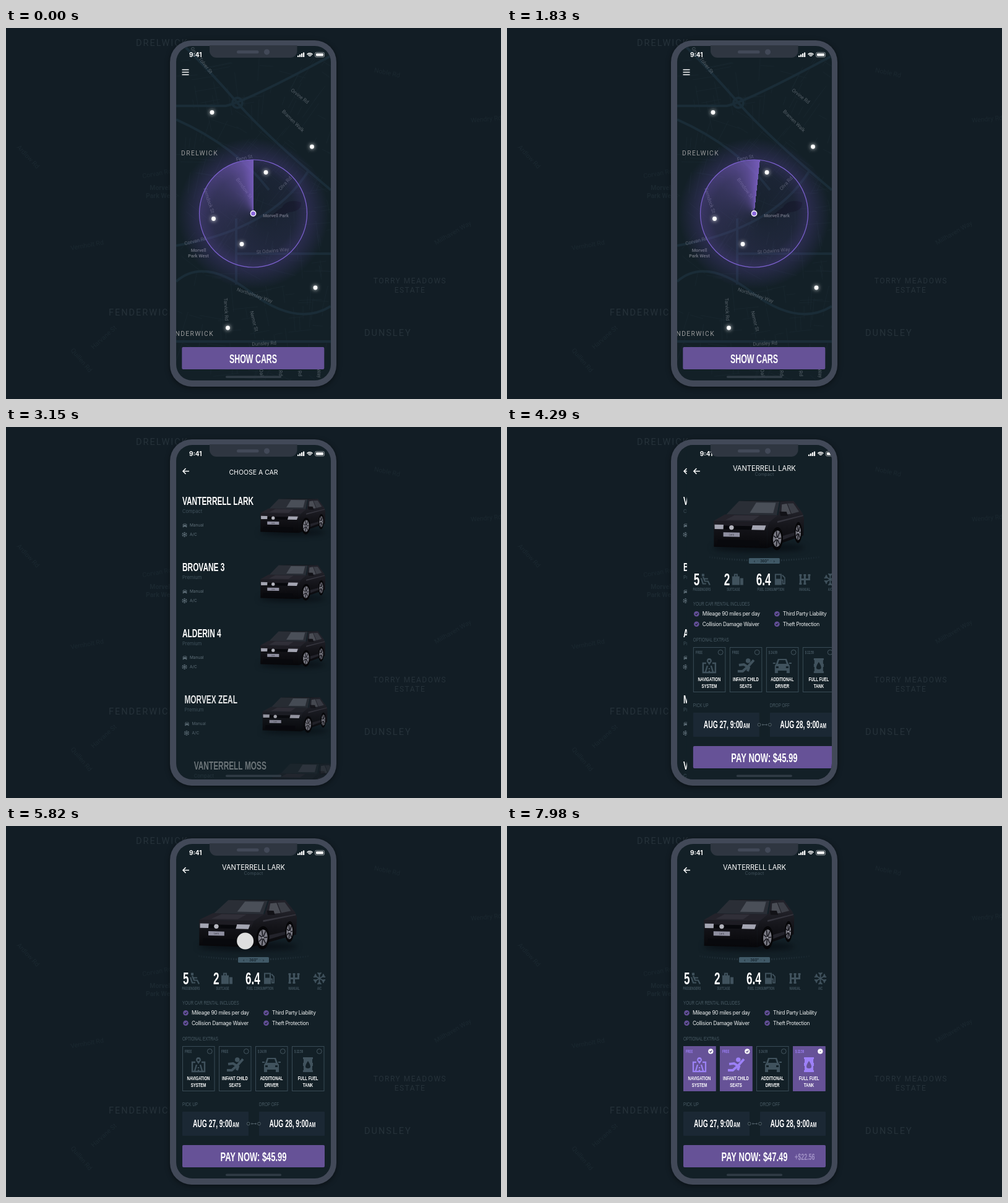
Animation, 800 px wide and 600 px high, one loop 8 s. Source, as an HTML page with a canvas:

```html
<!DOCTYPE html>
<html lang="en">
<head>
<meta charset="utf-8">
<title>Car rental app</title>
<style>
  html, body { margin: 0; width: 100%; height: 100%; overflow: hidden; background: #121d25; }
  canvas { display: block; }
</style>
</head>
<body>
<canvas id="stage" width="800" height="600"></canvas>
<script>
const ctx = document.getElementById('stage').getContext('2d');
const LOOP = 8000, TAU = Math.PI * 2;
const PAGE = '#132027', PURPLE = '#665297', LILAC = '#9d80f8', DIM = '#40525d', WHITE = '#fff';
const ROBOTO = 'Roboto, sans-serif';
const CAR_NAME = 'VANTERRELL LARK';

// ---------- helpers ----------
const clamp = v => Math.max(0, Math.min(1, v));
const span = (t, from, length) => clamp((t - from) / length);
const swing = p => (1 - Math.cos(Math.PI * clamp(p))) / 2;
const mix = (a, b, q) => a + (b - a) * q;

function scoped(draw) { ctx.save(); draw(); ctx.restore(); }

function text(str, x, y, o = {}) {
  const { size = 8, color = WHITE, align = 'center', weight = 400, family = 'Inter, sans-serif',
          spacing = 0, angle = 0, squeeze = 1 } = o;
  scoped(() => {
    ctx.translate(x, y);
    ctx.rotate(angle * Math.PI / 180);
    ctx.scale(squeeze, 1);
    ctx.font = `${weight} ${size}px ${family}`;
    ctx.letterSpacing = spacing + 'px';
    ctx.textAlign = align;
    ctx.fillStyle = color;
    ctx.fillText(str, 0, size * .36);
  });
}

// Condensed display face, sized by cap height.
function narrow(str, x, y, cap, color = WHITE, align = 'center', weight = 700) {
  text(str, x, y, { size: cap / .69, color, align, weight, squeeze: .63,
                    family: '"Liberation Sans", sans-serif' });
}

function box(x, y, w, h, r, color) {
  ctx.fillStyle = color;
  ctx.beginPath();
  ctx.roundRect(x, y, w, h, r);
  ctx.fill();
}

function disc(x, y, r, fill, stroke, width = 1) {
  ctx.beginPath();
  ctx.arc(x, y, r, 0, TAU);
  if (fill) { ctx.fillStyle = fill; ctx.fill(); }
  if (stroke) { ctx.strokeStyle = stroke; ctx.lineWidth = width; ctx.stroke(); }
}

function line(path, color, width = 1) {
  ctx.strokeStyle = color;
  ctx.lineWidth = width;
  ctx.stroke(typeof path === 'string' ? new Path2D(path) : path);
}

function check(x, y, size, color, width = 1) {
  line(`M${x - size} ${y}L${x - size * .2} ${y + size * .75}L${x + size} ${y - size * .7}`, color, width);
}

let seed = 11;
const random = () => (seed = seed * 16807 % 2147483647) / 2147483647;

// ---------- map ----------
const sideStreets = new Path2D();
for (let i = 0; i < 260; i++) {
  const x = 270 + random() * 260, y = 25 + random() * 550;
  const tilt = .25 + .45 * Math.sin(x / 70 + Math.floor(y / 130) * 1.7) + (random() < .5 ? Math.PI / 2 : 0);
  const length = 12 + random() * 38;
  sideStreets.moveTo(x, y);
  sideStreets.lineTo(x + Math.cos(tilt) * length, y + Math.sin(tilt) * length);
}
const mainRoads = new Path2D(`M275 126H355Q390 118 525 45M288 29Q330 70 374 121T525 262M275 148Q370 190 425 262
  M275 352Q430 325 488 232M372 308V415M372 365H525M275 410Q320 370 395 427T525 450M275 507H525`);

const streetLabels = [
  ['Great Tolver St', 316, 52, 52], ['Fenn St', 385, 210, -12], ['Orvine Rd', 475, 110, 38],
  ['Bramen Walk', 464, 150, 45], ['Olva Rd', 451, 251, -48], ['Ferndock St', 328, 279, 72],
  ['Brindow St', 385, 259, 54], ['Corvan Rd', 306, 344, -14], ['St Odwins Way', 431, 360, -5],
  ['Northelmley Way', 402, 432, 19], ['Tarvick Rd', 356, 455, 87], ['Nemor St', 401, 474, 76],
  ['Dunsley Rd', 417, 510, -3]
];
const backLabels = [
  ['Ardlow Rd', 36, 208, 47], ['Corvan Rd', 244, 235, -10], ['Vernholt Rd', 131, 351, -10],
  ['Harvane St', 158, 500, -42], ['Quillen Rd', 122, 537, 50], ['Noble Rd', 616, 72, 12],
  ['Wendry Rd', 776, 147, -5], ['Millhaven Way', 722, 331, -30]
];
const nearbyCars = [[333, 136.5], [494.5, 192], [420, 233.5], [335.5, 308.5], [381, 349.5], [500, 420], [358.5, 485]];

function backdrop() {
  ctx.fillStyle = '#121d25';
  ctx.fillRect(0, 0, 800, 600);
  const faint = { size: 10.5, color: '#1b2830', family: ROBOTO };
  for (const [name, x, y, angle] of backLabels) text(name, x, y, { ...faint, angle });
  text('Morvell', 250, 258, { ...faint, weight: 700 });
  text('Park West', 250, 271, { ...faint, weight: 700 });
  const area = { size: 14.5, color: '#26323a', family: ROBOTO, spacing: 2 };
  text('DRELWICK', 210, 24, { ...area, align: 'left' });
  text('FENDERWICK', 166, 460, { ...area, align: 'left' });
  text('DUNSLEY', 579, 493, { ...area, align: 'left' });
  text('TORRY MEADOWS', 653, 409, { ...area, size: 12, spacing: 1.5 });
  text('ESTATE', 653, 424, { ...area, size: 12, spacing: 1.5 });
}

function radar(t) {
  const x = 399.5, y = 300, r = 87;
  const glow = ctx.createRadialGradient(x, y, 0, x, y, 122);
  for (const [stop, alpha] of [[0, .04], [.55, .1], [.71, .27], [1, 0]])
    glow.addColorStop(stop, `rgba(104,76,180,${alpha})`);
  ctx.fillStyle = glow;
  ctx.fillRect(275, 175, 250, 250);

  const lead = t * .2 * Math.PI / 180 - Math.PI / 2;
  const sweep = ctx.createConicGradient(lead, x, y);
  for (let behind = 1; behind >= 0; behind -= 1 / 24)
    sweep.addColorStop(1 - behind, `rgba(127,98,200,${.6 * Math.exp(-behind * 13) + .28 * (1 - behind) ** 2})`);
  disc(x, y, r, sweep, '#7c61cf', 1.2);
  disc(x, y, 4.2, '#8a68dc', WHITE, 1.4);
}

function statusBar() {
  text('9:41', 296, 43, { size: 10, weight: 700, align: 'left' });
  for (let i = 0; i < 4; i++) box(471 + i * 3, 44.5 - i * 1.7, 2.2, 2.5 + i * 1.7, .5, WHITE);
  for (const r of [2, 4.1, 6.2]) {
    ctx.beginPath();
    ctx.arc(491, 47, r, -Math.PI * .76, -Math.PI * .24);
    ctx.strokeStyle = WHITE;
    ctx.lineWidth = 1.4;
    ctx.stroke();
  }
  ctx.beginPath();
  ctx.roundRect(499.5, 39.5, 15, 7.5, 2);
  ctx.strokeStyle = '#a0a6aa';
  ctx.lineWidth = .9;
  ctx.stroke();
  box(501, 41, 12, 4.5, 1, WHITE);
}

const homeBar = () => box(355, 562.5, 90, 3.5, 1.7, '#303b45');

function mapPage(t) {
  line(sideStreets, '#1a2931', .7);
  line(mainRoads, '#1a2c37', 4);
  disc(374, 121, 8, null, '#1a2c37', 4);
  ctx.fillStyle = '#0e161e';
  ctx.fill(new Path2D('M427 309Q430 300 446 290Q455 275 477 282Q478 296 458 298Z'));
  const street = { size: 8, color: '#566068', family: ROBOTO };
  for (const [name, x, y, angle] of streetLabels) text(name, x, y, { ...street, angle });
  ['Ulmer Oak', 'Hollin Rd', 'Trevin Rd', 'Sorrel Way'].forEach((name, i) =>
    text(name, 412 + i * 31, 547, { ...street, angle: 84 }));
  const park = { ...street, size: 7.3, weight: 700, color: '#666d75' };
  text('Morvell Park', 436, 303, park);
  text('Morvell', 311, 359, park);
  text('Park West', 311, 368, park);
  const area = { size: 10.3, color: '#98999a', family: ROBOTO, spacing: 1.4 };
  text('DRELWICK', 283, 202.5, { ...area, align: 'left' });
  text('FENDERWICK', 336, 494.5, { ...area, align: 'right' });
  radar(t);
  scoped(() => {
    ctx.shadowColor = WHITE;
    ctx.shadowBlur = 6;
    for (const [x, y] of nearbyCars) disc(x, y, 3.4, WHITE);
  });
  statusBar();
  line('M284.5 67.5h11m-11 4h11m-11 4h11', WHITE, 1.3);
  box(284.3, 516, 230, 36, 2, PURPLE);
  const press = Math.sin(Math.PI * span(t, 2000, 220));
  if (press > 0) box(284.3, 516, 230, 36, 2, `rgba(255,255,255,${press * .15})`);
  narrow('SHOW CARS', 399.5, 534.5, 13.6);
  homeBar();
}

// ---------- car: a small solid model, turned about its upright axis ----------
// x runs from nose to tail, side from -1 to 1 across, z up from the ground.
const TAIL = 235;
const PROFILE = [[0, 6], [0, 38], [7, 48], [62, 56], [108, 77], [198, 75], [228, 52], [TAIL, 42], [231, 10]];

function camera(yaw) {
  const sin = Math.sin(yaw), cos = Math.cos(yaw);
  return (x, side, z) => {
    const along = x - TAIL / 2;
    const across = side * (50 - Math.max(0, z - 48) * .4 - Math.max(0, 12 - x) * .4);
    const scale = 1 / (1 + (along * cos - across * sin + 115) / 1400);
    return [394 + (along * sin + across * cos) * scale, 70 + (131 - z) * scale];
  };
}

function car(turn) {
  const project = camera(mix(.284, .489, turn));
  const shape = points => {
    const path = new Path2D();
    for (const point of points) path.lineTo(...project(...point));
    path.closePath();
    return path;
  };
  const paint = (color, points) => { ctx.fillStyle = color; ctx.fill(shape(points)); };
  const panel = (color, [x1, z1], [x2, z2], from = -1, to = 1) =>
    paint(color, [[x1, from, z1], [x1, to, z1], [x2, to, z2], [x2, from, z2]]);
  const flank = (color, points) => paint(color, points.map(([x, z]) => [x, 1, z]));
  const circle = (x, r, steer) => Array.from({ length: 28 }, (_, i) => {
    const reach = r * Math.cos(i / 28 * TAU);
    return [x + reach * Math.cos(steer), 1 + reach * Math.sin(steer) / 50, 18 + r * Math.sin(i / 28 * TAU)];
  });
  const [nose, lip, cowl, roof, roofEnd] = PROFILE.slice(1, 6);

  scoped(() => {
    ctx.filter = 'blur(4px)';
    ctx.fillStyle = '#0a1117';
    ctx.beginPath();
    ctx.ellipse(391, 195, mix(74, 92, turn), 7, 0, 0, TAU);
    ctx.fill();
  });

  const gloss = ctx.createLinearGradient(0, 135, 0, 195);
  gloss.addColorStop(0, '#22222a');
  gloss.addColorStop(.5, '#131318');
  gloss.addColorStop(1, '#07070a');
  panel(gloss, PROFILE[0], nose);
  panel('#1d1c23', nose, lip);
  panel('#24232b', lip, cowl);
  panel('#302f38', [14, 49.5], [56, 55], -.6, .35);
  flank(gloss, PROFILE);
  panel('#2a2e36', cowl, roof, -.95, .95);
  panel('#4a4f58', [68, 59], [104, 75], -.1, .8);
  panel('#17181d', roof, roofEnd);

  // side glass, shoulder line and lower door highlight
  flank('#4a4d55', [[80, 55], [110, 72], [144, 72], [145, 54]]);
  flank('#3b3e46', [[150, 54], [149, 72], [190, 71], [207, 55]]);
  flank('#34343d', [[45, 47], [228, 48], [228, 46], [45, 44]]);
  flank('#23232b', [[70, 20], [168, 20], [168, 15], [70, 13]]);

  // nose: grille, air intake, lamps, plate and a plain badge
  panel('#07080c', [0, 35], [0, 41], -.9, .75);
  panel('#08090d', [0, 9], [0, 18], -.85, .7);
  for (const [from, to] of [[-.97, -.64], [.42, .9]]) panel('#a4a5b2', [0, 35], [4, 42], from, to);
  panel('#8f8fa0', [0, 23], [0, 30], -.64, -.02);
  const [badgeX, badgeY] = project(0, -.33, 38), [plateX, plateY] = project(0, -.33, 26.5);
  disc(badgeX, badgeY, 3.7, '#b4b5be');
  text('Lark', plateX, plateY, { size: 4, color: '#303039', angle: 3 });
  panel('#121217', [78, 54], [82, 61], .98, 1.25);

  for (const [x, steer] of [[190, .12], [44, .27]]) {
    paint('#060608', circle(x, 19, steer));
    paint('#7c7c86', circle(x, 13.5, steer));
    const hub = project(x, 1, 18);
    circle(x, 13, steer).forEach((rim, i) => {
      if (i % 4 === 0) line(`M${hub}L${project(...rim)}`, '#1a1a20', 1.6);
    });
    disc(...hub, 1.6, '#9a9aa4');
  }
}

// ---------- icons ----------
function icon({ fill, stroke, width = 2 }, x, y, scale, color) {
  scoped(() => {
    ctx.translate(x, y);
    ctx.scale(scale, scale);
    ctx.fillStyle = color;
    if (fill) ctx.fill(new Path2D(fill), 'evenodd');
    if (stroke) line(stroke, color, width);
  });
}

const icons = {
  map: { stroke: 'M-5 -4H-10V11H10V-4H5M-3 0L-6 10M3 0L6 10M0 4V6M0 8V11', width: 2.4,
         fill: 'M0 -1L-4 -7Q-4 -12 0 -12T4 -7ZM-1.5 -9h3v3h-3Z' },
  infant: { stroke: 'M-13 9H-5L4 1L13 -9M-11 -1L-3 -2L5 3L3 9', width: 4,
            fill: 'M0 -8a3.8 3.8 0 1 0 7.6 0a3.8 3.8 0 1 0 -7.6 0Z' },
  car: { fill: 'M-10 -3L-7 -11H7L10 -3L12 0V12H7V8H-7V12H-12V0ZM-7 -3H7L5 -9H-5ZM-10 1h4v3h-4ZM6 1h4v3h-4Z',
         stroke: 'M-15 -4h4M11 -4h4' },
  barrel: { fill: 'M-8 -12H8V-9H7V-3H8V2H7V9H8V12H-8V9H-7V2H-8V-3H-7V-9H-8ZM0 -6Q8 6 0 6T0 -6Z' },
  seat: { stroke: 'M-4 -4L-1 3H4L7 9M-3 -1H4M-7 -2L-4 7H1', width: 2.2,
          fill: 'M-6 -9h4v4h-4Z' },
  luggage: { fill: 'M-9 -5H-6V-9H0V-5H3V9H-9ZM-4 -7V-5H-2V-7ZM4 -2H9V9H4Z' },
  pump: { fill: 'M-8 -9H3V9H-8ZM-6 -7V-1H1V-7Z', stroke: 'M3 1H5V7H8V-3L4 -7', width: 1.8 },
  gears: { stroke: 'M-7 -8V8M0 -8V8M7 -8V0H-7M-9 -7h4M-2 -7h4M5 -7h4M-9 7h4M-2 7h4', width: 3 }
};

const backArrow = () => line('M296 71.5H286M290.5 67L286 71.5L290.5 76', WHITE, 1.5);

function snowflake(x, y, r, color, width) {
  for (let i = 0; i < 6; i++) scoped(() => {
    ctx.translate(x, y);
    ctx.rotate(i * TAU / 6 + TAU / 12);
    line(`M0 0H${r}M${r} ${-r * .3}L${r * .6} 0L${r} ${r * .3}`, color, width);
  });
}

// ---------- list page ----------
const listItems = [[CAR_NAME, 'Compact'], ['BROVANE 3', 'Premium'], ['ALDERIN 4', 'Premium'],
                   ['MORVEX ZEAL', 'Premium'], ['VANTERRELL MOSS', 'Compact']];

function listPage(t) {
  const grey = { size: 6.5, color: '#60707a', align: 'left' };
  statusBar();
  backArrow();
  scoped(() => {
    ctx.globalAlpha = span(t, 2250, 600);
    text('CHOOSE A CAR', 400, 73, { size: 10.5 });
  });
  listItems.forEach(([name, kind], i) => scoped(() => {
    const p = swing(span(t, 2480 + i * 130, 360)), y = 119 + i * 107;
    ctx.globalAlpha = p;
    ctx.translate(30 * (1 - p), 0);
    narrow(name, 285, y, 13, WHITE, 'left');
    text(kind, 285, y + 17.5, { size: 7.5, color: DIM, align: 'left' });
    icon(icons.car, 289, y + 40, .27, grey.color);
    text('Manual', 297, y + 40, grey);
    snowflake(288.5, y + 55, 4, grey.color, .8);
    text('A/C', 297, y + 55, grey);
    ctx.translate(462, y + 27);
    ctx.scale(.72, .72);
    ctx.translate(-389, -161);
    car(0);
  }));
  homeBar();
}

// ---------- detail page ----------
const extras = [
  { price: 'FREE', art: 'map', lines: ['NAVIGATION', 'SYSTEM'], tap: 6450 },
  { price: 'FREE', art: 'infant', lines: ['INFANT CHILD', 'SEATS'], tap: 7005 },
  { price: '$ 24.99', art: 'car', lines: ['ADDITIONAL', 'DRIVER'], tap: Infinity },
  { price: '$ 22.56', art: 'barrel', lines: ['FULL FUEL', 'TANK'], tap: 7560 }
];

function extraCard({ price, art, lines, tap }, x, t) {
  const age = t - tap, fill = 73 * swing(age / 375), chosen = clamp(age / 110);
  ctx.lineWidth = 1;
  ctx.strokeStyle = chosen > .3 ? PURPLE : '#394b56';
  ctx.strokeRect(x + .5, 356.5, 51.5, 72);
  scoped(() => {
    ctx.globalAlpha = chosen * .1;
    box(x, 356, 52.5, 73, 1, PURPLE);
  });
  box(x, 429 - fill, 52.5, fill, 1, PURPLE);
  narrow(price, x + 4, 364.5, 4.6, age > 300 ? LILAC : '#465863', 'left');
  icon(icons[art], x + 26, 386, 1, DIM);
  scoped(() => {
    ctx.globalAlpha = chosen;
    icon(icons[art], x + 26, 386, 1, LILAC);
  });
  lines.forEach((str, i) => narrow(str, x + 26, 408 + i * 11, 6.6));
  disc(x + 44.3, 364.4, 3.9, `rgba(255,255,255,${clamp(age / 300)})`, age > 150 ? 'rgba(255,255,255,.6)' : '#4a5c66', .9);
  const tick = span(age, 390, 150);
  if (tick) check(x + 44.3, 364.4, 1.9 * tick, '#4a3b78', 1.1);
  if (age > 0 && age < 360) disc(x + 27.5, 388.5, age / 180 * 16, null, `rgba(235,230,255,${1 - age / 360})`, 1.5);
}

function specs() {
  const columns = [['5', 286, 'seat', 305, 'PASSENGERS', 299], ['2', 335, 'luggage', 357, 'SUITCASE', 350],
                   ['6.4', 387, 'pump', 425, 'FUEL CONSUMPTION', 410.5], ['', 0, 'gears', 465.5, 'MANUAL', 465.5]];
  for (const [value, x, art, artX, label, labelX] of columns) {
    narrow(value, x, 246.5, 18.7, WHITE, 'left');
    icon(icons[art], artX, 246.5, 1, DIM);
    narrow(label, labelX, 262.5, 4.6, DIM);
  }
  snowflake(506.5, 246.5, 9.5, DIM, 1.8);
  narrow('A/C', 506.5, 262.5, 4.6, DIM);
}

function dateBox(x, width, day) {
  const split = x + width / 2 + 27;
  box(x, 462, width, 39, 1, '#1b2834');
  narrow(`AUG ${day}, 9:00`, split, 481.5, 11.3, WHITE, 'right');
  narrow('AM', split + .5, 483, 7.6, WHITE, 'left');
}

function detailPage(t) {
  statusBar();
  backArrow();
  text(CAR_NAME, 400, 67.5, { size: 11.1 });
  text('Compact', 400, 76.5, { size: 7.2, color: '#40515b' });

  for (let i = -22; i <= 22; i++) {
    const x = 400 + i * 4, y = 216 - i * i * .011;
    if (Math.abs(i) > 6) line(`M${x} ${y - 1.5}v3`, `rgba(74,94,106,${.75 - Math.abs(i) * .025})`, .9);
  }
  box(375, 212, 50, 9, 1.5, '#405967');
  text('‹  ·  360°  ·  ›', 400, 216.5, { size: 5.8, color: '#13212a', weight: 600 });

  const turn = swing(span(t, 4590, 600)) - swing(span(t, 5400, 690));
  car(turn);
  const touch = Math.min(span(t, 4590, 90), 1 - span(t, 6000, 90));
  if (touch > 0) disc(400 - 40.5 * turn, 186, 13.5, `rgba(232,232,232,${touch * .96})`);

  specs();
  const heading = (str, x, y) => narrow(str, x, y, 6.8, '#485a64', 'left', 400);
  heading('YOUR CAR RENTAL INCLUDES', 285, 285.5);
  ['Mileage 90 miles per day', 'Third Party Liability', 'Collision Damage Waiver', 'Theft Protection'].forEach((str, i) => {
    const x = 290.5 + i % 2 * 130, y = 302.2 + (i >> 1) * 16.5;
    disc(x, y, 4.3, '#644f98');
    check(x, y, 1.9, PAGE, 1.1);
    text(str, x + 9.5, y, { size: 8.4, align: 'left', spacing: -.28, color: '#eef0f1' });
  });
  heading('OPTIONAL EXTRAS', 285, 343);
  extras.forEach((extra, i) => extraCard(extra, 285 + i * 59, t));

  heading('PICK UP', 285, 449);
  heading('DROP OFF', 409, 449);
  dateBox(285, 107, 27);
  dateBox(409, 106, 28);
  for (const x of [391.7, 409]) disc(x, 481.5, 2.4, PAGE, '#53626b', 1);
  line('M396.5 481.5h8M398 480l-1.5 1.5l1.5 1.5M403 480l1.5 1.5l-1.5 1.5', '#53626b', .9);

  box(285, 516, 230, 36, 2, PURPLE);
  const total = 45.99 + 22.56 * span(t, 7921, 900);
  narrow(`PAY NOW: $${total.toFixed(2)}`, 400, 534.3, 14.2);
  scoped(() => {
    ctx.globalAlpha = span(t, 7800, 150);
    narrow('+$22.56', 465, 534.5, 9.8, '#a091c6', 'left');
  });
  homeBar();
}

// ---------- phone ----------
function slidePage(offset, draw, edge) {
  if (offset >= 250) return;
  scoped(() => {
    ctx.translate(offset, 0);
    ctx.fillStyle = PAGE;
    ctx.fillRect(275, 29, 250, 541);
    draw();
    if (edge && offset > 0) line('M274.7 29V570', '#66737c', 1);
  });
}

function render(t) {
  backdrop();
  scoped(() => {
    ctx.shadowColor = 'rgba(0,0,0,.45)';
    ctx.shadowBlur = 8;
    ctx.shadowOffsetY = 2;
    box(265, 20, 269, 560, 35, '#424958');
  });
  const listOffset = 250 * (1 - swing(span(t, 2202, 395)));
  const detailOffset = 250 * (1 - swing(span(t, 3960, 395)));
  scoped(() => {
    ctx.beginPath();
    ctx.roundRect(275, 29, 250, 541, 26);
    ctx.clip();
    if (listOffset > 0) slidePage(0, () => mapPage(t));
    if (detailOffset > 0) slidePage(listOffset, () => listPage(t), true);
    slidePage(detailOffset, () => detailPage(t));
  });
  box(329, 28, 141.5, 20, [0, 0, 11, 11], '#2f3641');
  box(373, 36.3, 35.5, 5, 2.5, '#424958');
  disc(421.5, 38.8, 4.6, '#424958');
}

const start = performance.now();
function tick() {
  render((performance.now() - start) % LOOP);
  requestAnimationFrame(tick);
}
tick();
</script>
</body>
</html>
```
